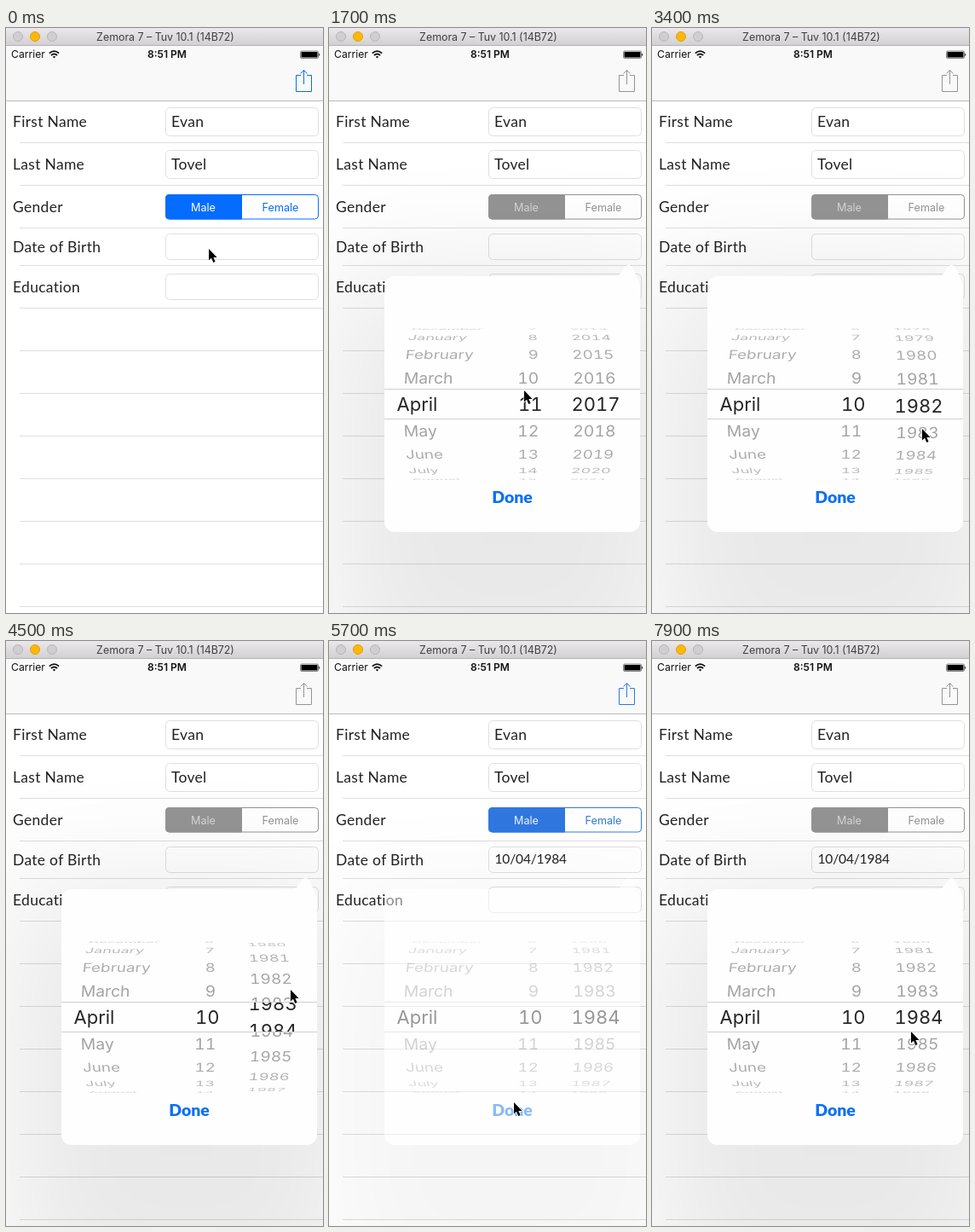
Animation, 372 px wide and 686 px high, one loop 8 s. Source, as an HTML page:

```html
<!DOCTYPE html>
<html lang="en">
<head>
<meta charset="utf-8">
<title>Date picker form</title>
<style>
  html, body { margin: 0; width: 100%; height: 100%; overflow: hidden; background: #fff; }
  svg { display: block; width: 100%; height: 100%; }
  text { font-family: Inter, "Open Sans", sans-serif; white-space: pre; }
  .form { font: 17.5px Lato, sans-serif; letter-spacing: .3px; fill: #222; }
  .date { font: 15.5px Lato, sans-serif; letter-spacing: -.15px; fill: #222; }
  .done { font: 900 19.5px Lato, sans-serif; fill: #0a70f5; }
  .mid { text-anchor: middle; }
  .row { font-size: 19.6px; fill: #999; font-variant-numeric: tabular-nums; }
  .picked { font-size: 22px; fill: #262626; font-variant-numeric: tabular-nums; }
</style>
</head>
<body>
<svg viewBox="0 0 372 686" xmlns="http://www.w3.org/2000/svg">
  <defs>
    <linearGradient id="bar" x2="0" y2="1">
      <stop stop-color="#eae8ea"/><stop offset="1" stop-color="#d2d0d2"/>
    </linearGradient>
    <filter id="soft" filterUnits="userSpaceOnUse" x="-300" y="-50" width="1000" height="1150">
      <feGaussianBlur stdDeviation="75"/>
    </filter>
    <clipPath id="outer"><path d="M65 352H365V424H65ZM65 459H365V530H65Z"/></clipPath>
    <clipPath id="band"><path d="M65 424H365V458H65Z"/></clipPath>
  </defs>
  <rect width="372" height="686" fill="#fff"/>
  <rect y="20" width="372" height="65" fill="#f9f9f9"/>
  <path d="M0 85.5H372" stroke="#bdbdbd"/>
  <g id="form"></g>

  <g id="tinted" fill="none">
    <path d="M346 55.5H340.5V74.5H358.5V55.5H353M349.5 66V49.5M345.5 53.5L349.5 49.5L353.5 53.5"/>
    <rect x="187.5" y="195.5" width="179" height="28.5" rx="4" fill="#fff"/>
    <path id="male" d="M276.5 195.5H191.5A4 4 0 0 0 187.5 199.5V220A4 4 0 0 0 191.5 224H276.5Z"/>
  </g>
  <text id="maleText" class="mid" x="231.5" y="214.6" font-size="12.6">Male</text>
  <text id="femaleText" class="mid" x="322" y="214.6" font-size="12.6">Female</text>
  <text id="birth" class="date" x="194.5" y="261.3">10/04/1984</text>

  <g id="popover">
    <rect y="285" width="420" height="500" opacity=".085" filter="url(#soft)"/>
    <path d="M77 291H337C343 291 346 278 351.5 278S359 289 362.5 294.5Q365 298 365 303V579A12 12 0 0 1 353 591H77A12 12 0 0 1 65 579V303A12 12 0 0 1 77 291Z" fill="#fefefe"/>
    <g id="rows" clip-path="url(#outer)"></g>
    <g id="picked" clip-path="url(#band)"></g>
    <path d="M65 423.5H365M65 458.5H365" stroke="#cfcfcf"/>
    <text class="done mid" x="215" y="556.6">Done</text>
  </g>

  <rect width="372" height="20" fill="url(#bar)"/>
  <path d="M0 20.5H372" stroke="#b4b2b4"/>
  <g fill="#d0ced0" stroke="#b8b6b8">
    <circle cx="14" cy="10" r="5.5"/>
    <circle cx="34" cy="10" r="5.5" fill="#fdb805" stroke="#e0a010"/>
    <circle cx="54" cy="10" r="5.5"/>
  </g>
  <text class="mid" x="187" y="14.6" font-size="12.4" fill="#404040">Zemora 7 – Tuv 10.1 (14B72)</text>
  <text x="6" y="35.4" font-size="12.2" fill="#111">Carrier</text>
  <g fill="none" stroke="#111" stroke-width="1.8">
    <path d="M50.8 29.6Q56.5 24.6 62.2 29.6M52.9 32Q56.5 28.9 60.1 32"/>
    <path d="M56.5 35.6L54.8 33.8Q56.5 32.4 58.2 33.8Z" fill="#111" stroke="none"/>
  </g>
  <text class="mid" x="189" y="35.4" font-size="12" font-weight="600" fill="#111">8:51 PM</text>
  <rect x="345.5" y="27" width="21" height="8.5" rx="1.5" fill="none" stroke="#666" stroke-width=".8"/>
  <rect x="346.5" y="28" width="19" height="6.5" rx=".5"/>
  <path d="M367.3 29.5Q369.4 31.3 367.3 33Z"/>

  <path id="cursor" d="M0 0V13.6L3 10.8L5.3 16L7.6 15L5.4 10H9.6Z" stroke="#fff" stroke-width="1.2" paint-order="stroke"/>
</svg>
<script>
const NS = 'http://www.w3.org/2000/svg';
const LOOP = 8000;
const $ = id => document.getElementById(id);

function add(parent, tag, attrs, text) {
  const el = document.createElementNS(NS, tag);
  for (const k in attrs) el.setAttribute(k, attrs[k]);
  if (text) el.textContent = text;
  return parent.appendChild(el);
}

// Form rows, then empty rows down to the bottom
const fields = [
  { label: 'First Name', box: 33, value: 'Evan' },
  { label: 'Last Name', box: 33, value: 'Tovel' },
  { label: 'Gender' },
  { label: 'Date of Birth', box: 30, height: 44 },
  { label: 'Education', box: 30 }
];
for (let i = 0, top = 84; top < 678; i++) {
  const { label, box, value, height = 50 } = fields[i] || {};
  const mid = top + height / 2, text = { y: mid + 6.5, class: 'form' };
  top += height;
  add($('form'), 'path', { d: `M16 ${top + .5}H372`, stroke: '#dedede' });
  if (label) add($('form'), 'text', { x: 8, ...text }, label);
  if (box) add($('form'), 'rect', {
    x: 187.5, y: Math.round(mid - box / 2) + .5, width: 179, height: box, rx: 5, fill: '#fff', stroke: '#dfdfdf'
  });
  if (value) add($('form'), 'text', { x: 194, ...text }, value);
}

// Each move eases the value towards its goal between two times
const smooth = x => x * x * (3 - 2 * x);
const easeOut = x => 1 - (1 - x) ** 3;

function follow(t, value, moves) {
  for (const [from, to, goal, ease = smooth] of moves) {
    const p = ease(Math.min(1, Math.max(0, (t - from) / (to - from))));
    value = value.map((v, i) => v + (goal[i] - v) * p);
  }
  return value;
}

const pointer = t => follow(t, [238, 259], [
  [350, 1200, [229, 425]],
  [1750, 2150, [230, 457]],
  [2250, 3100, [317, 470]],
  [4000, 4500, [334, 409]],
  [4700, 5400, [217, 541]],
  [5750, 6700, [306, 259]],
  [7150, 7900, [304, 458]]
]);
const day = t => follow(t, [11], [[1750, 2200, [10]]])[0];
const year = t => follow(t, [2017], [
  [2500, 3400, [1981.94], easeOut],
  [4000, 4500, [1983.5]],
  [4700, 4950, [1984]]
])[0];
const opacity = t => follow(t, [0], [[150, 550, [1]], [5520, 5870, [0]], [7050, 7450, [1]]])[0];

// Wheels
const MONTHS = ['January', 'February', 'March', 'April', 'May', 'June', 'July',
  'August', 'September', 'October', 'November', 'December'];
const wrap = (n, size) => (n % size + size) % size;
const RADIUS = 89, STEP = .358, CX = 215, CY = 441;

function makeWheel(x, pickedX, anchor, label) {
  const pool = (group, cls, n) => Array.from({ length: n }, () =>
    add($(group), 'text', { class: cls, 'text-anchor': anchor, y: cls === 'row' ? 7.2 : 8 }));
  const rows = pool('rows', 'row', 9), picked = pool('picked', 'picked', 3);

  function place(el, i, value, isRow) {
    const angle = (i - value) * STEP;
    const c = Math.cos(angle), y = CY + RADIUS * Math.sin(angle);
    el.style.display = c > .03 ? '' : 'none';
    el.textContent = label(i);
    if (!isRow) {
      el.setAttribute('transform', `matrix(1 0 0 ${c} ${pickedX} ${y})`);
      return;
    }
    const size = 1 - .15 * (1 - c);
    const px = CX + (x - CX) * (1 - .09 * (1 - c));
    const shear = (CX - x) * .09 * Math.sin(angle) / RADIUS;
    el.setAttribute('transform', `matrix(${size} 0 ${shear} ${size * c} ${px} ${y})`);
    el.setAttribute('opacity', .45 + .47 * c);
  }

  return value => {
    const mid = Math.round(value);
    rows.forEach((el, k) => place(el, mid + k - 4, value, true));
    picked.forEach((el, k) => place(el, mid + k - 1, value, false));
  };
}

const setMonth = makeWheel(87, 79.5, 'start', i => MONTHS[wrap(i, 12)]);
const setDay = makeWheel(246.5, 250.5, 'end', i => wrap(i - 1, 31) + 1);
const setYear = makeWheel(312, 313, 'middle', i => i);

const mix = (a, b, p) => `rgb(${a.map((v, i) => Math.round(v + (b[i] - v) * p))})`;

function draw(t) {
  const shown = opacity(t), dim = shown ** 1.6;
  const tint = mix([4, 108, 255], [148, 148, 148], dim);
  $('popover').setAttribute('opacity', shown);
  $('tinted').setAttribute('stroke', tint);
  $('male').setAttribute('fill', tint);
  $('femaleText').setAttribute('fill', tint);
  $('maleText').setAttribute('fill', mix([255, 255, 255], [214, 214, 214], dim));
  $('birth').style.display = t >= 5600 ? '' : 'none';
  setMonth(3);
  setDay(day(t));
  setYear(year(t));
  $('cursor').setAttribute('transform', `translate(${pointer(t)})`);
}

const start = performance.now();
function tick() {
  draw((performance.now() - start) % LOOP);
  requestAnimationFrame(tick);
}
tick();
</script>
</body>
</html>
```
